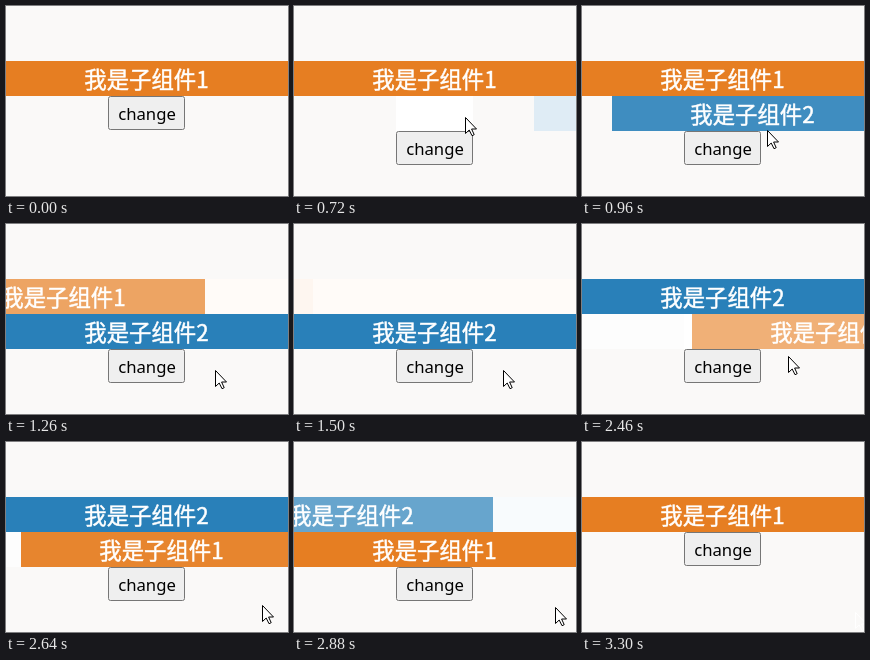
These frames come from a looping animation (282x190 px, 3900 ms). An HTML page with a canvas:

```html
<!DOCTYPE html>
<html lang="zh">
<head>
<meta charset="utf-8">
<style>
html, body { margin: 0; width: 100%; height: 100%; overflow: hidden; background: #faf9f8; }
canvas { display: block; }
</style>
</head>
<body>
<canvas id="stage" width="282" height="190"></canvas>
<script>
const ctx = document.getElementById('stage').getContext('2d');
const W = 282, H = 190, LOOP = 3900, STEP = 60, DURATION = 500;
const TOP = 55, ROW = 35;
const one = { text: '我是子组件1', color: '#e67e22' };
const two = { text: '我是子组件2', color: '#2980b9' };
const swaps = [
  { enter: 654, leave: 1160, end: 1680, from: one, to: two },
  { enter: 2283, leave: 2780, end: 3300, from: two, to: one }
];
// time, x, y of the pointer tip
const path = [
  [60, 264, 67], [480, 171, 111], [780, 171, 111], [1260, 209, 146],
  [1740, 209, 146], [2040, 181, 113], [2160, 172, 111], [2340, 172, 111],
  [2640, 256, 163], [2760, 261, 165], [2880, 261, 165], [3120, 273, 170]
];
const arrow = new Path2D('M.5 .5V16.5L4.2 13L7 18.7L9.2 17.7L6.6 12H11.5Z');

// CSS "ease": cubic-bezier(.25, .1, .25, 1)
function ease(x) {
  if (x <= 0) return 0;
  if (x >= 1) return 1;
  let lo = 0, hi = 1, s;
  for (let i = 0; i < 24; i++) {
    s = (lo + hi) / 2;
    if (.75 * s * (1 - s) + s ** 3 < x) lo = s; else hi = s;
  }
  return .3 * s * (1 - s) ** 2 + 3 * (1 - s) * s * s + s ** 3;
}

function box(x, y, w, h, color, alpha = 1) {
  ctx.globalAlpha = alpha;
  ctx.fillStyle = color;
  ctx.fillRect(x, y, w, h);
  ctx.globalAlpha = 1;
}

function label(text, x, y, font, color) {
  ctx.font = font;
  ctx.textAlign = 'center';
  ctx.fillStyle = color;
  ctx.fillText(text, x, y);
}

// White text fading over white stays white, so only the bar is blended.
function banner(item, x, y, alpha) {
  box(x, y, W, ROW, item.color, alpha);
  const at = [item.text, x + W / 2 - .5, y + 26.5];
  label(...at, '22.4px "Noto Sans CJK SC", "Noto Sans CJK", sans-serif', '#fff');
  ctx.strokeStyle = '#fff';
  ctx.lineWidth = .5;
  ctx.strokeText(...at);
  ctx.lineWidth = 1;
}

function button(y, hover) {
  ctx.beginPath();
  ctx.roundRect(102.5, y + .5, 76, 33, 2);
  ctx.fillStyle = hover ? '#e5e5e5' : '#efefef';
  ctx.fill();
  ctx.strokeStyle = hover ? '#4f4f4f' : '#767676';
  ctx.stroke();
  label('change', 141, y + 24, '300 16.7px "Noto Sans", sans-serif', '#000');
}

function pointer(t) {
  if (t < path[0][0]) return null;
  const i = path.findIndex(p => p[0] > t);
  if (i < 0) return path.at(-1).slice(1);
  const [a, ax, ay] = path[i - 1], [b, bx, by] = path[i];
  const k = (t - a) / (b - a);
  return [Math.round(ax + (bx - ax) * k), Math.round(ay + (by - ay) * k)];
}

function drawPointer([x, y], gone) {
  ctx.save();
  ctx.translate(x, y);
  ctx.fillStyle = gone ? '#faf9f8' : '#fff';
  ctx.strokeStyle = gone ? '#fff' : '#000';
  ctx.fill(arrow);
  ctx.stroke(arrow);
  ctx.restore();
}

function draw(t) {
  const swap = swaps.find(s => t >= s.enter && t < s.end);
  const middle = t >= swaps[0].end && t < swaps[1].end;
  const buttonY = TOP + ROW * (swap ? 2 : 1);
  const tip = pointer(t);

  box(0, 0, W, H, '#faf9f8');
  if (middle) {
    box(0, TOP + ROW, W, ROW, '#fdfdfd');
    if (!swap) box(102, 125, 77, 34, '#fff');
  }
  if (swap) {
    const entered = ease((t - swap.enter) / DURATION);
    const left = ease((t - swap.leave) / DURATION);
    const x = Math.round(W * (1 - entered));
    const out = Math.round(W * (1 - left));
    box(0, TOP, W, ROW, '#fff');
    box(out, TOP, W - out, ROW, swap.from.color, .03);
    banner(swap.from, out - W, TOP, 1 - left);
    box(102, TOP + ROW, 77, ROW, '#fff');
    box(x, TOP + ROW, W - x, ROW, '#fff');
    banner(swap.to, x, TOP + ROW, entered);
  } else {
    banner(middle ? two : one, 0, TOP, 1);
  }

  const hover = tip && tip[0] >= 102 && tip[0] < 179 && tip[1] >= buttonY && tip[1] < buttonY + 34;
  button(buttonY, hover);
  if (tip) drawPointer(tip, t >= 3120);
}

function frame(now) {
  draw(Math.floor(now % LOOP / STEP) * STEP);
  requestAnimationFrame(frame);
}
requestAnimationFrame(frame);
</script>
</body>
</html>
```
